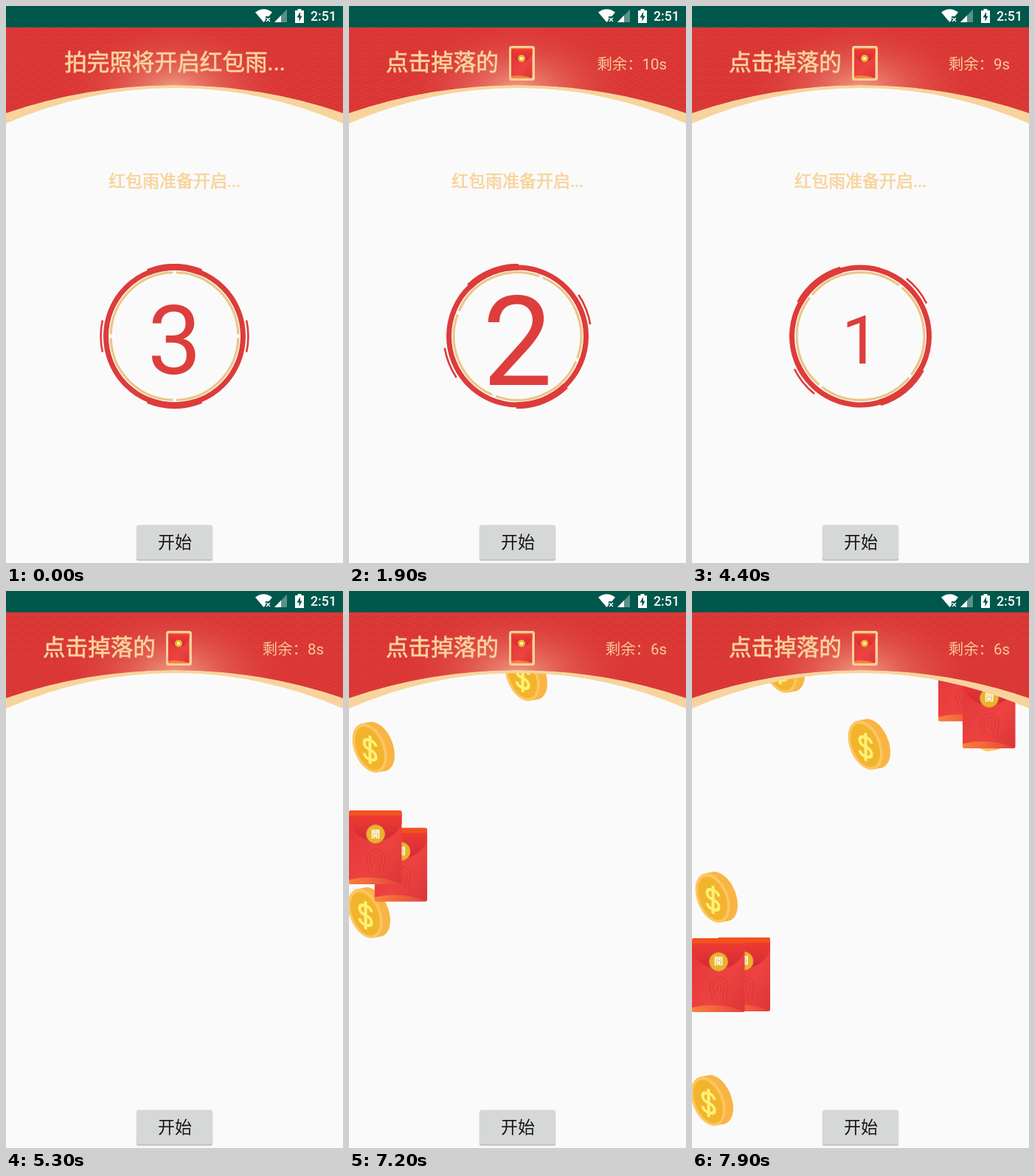
An HTML page for the animation above (8 s loop, 457 px wide and 754 px high).

```html
<!DOCTYPE html>
<html lang="zh-CN">
<head>
<meta charset="utf-8">
<style>
  html, body { margin: 0; height: 100%; overflow: hidden; background: #fafafa; }
  svg { display: block; width: 457px; height: 754px; font-family: Roboto, "Noto Sans CJK SC", "Noto Sans CJK", sans-serif; }
  .gold { fill: #f8d49c; }
  .strong { stroke: #f8d49c; stroke-width: .7; }
  .ring { fill: none; stroke: #dd3c3a; }
</style>
</head>
<body>
<svg viewBox="0 0 457 754">
  <defs>
    <radialGradient id="glow" gradientUnits="userSpaceOnUse" cx="0" cy="0" r="1" gradientTransform="translate(228.5 112) scale(150 88)">
      <stop offset="0" stop-color="#f2ae90" stop-opacity=".85"/>
      <stop offset=".45" stop-color="#ea7c6c" stop-opacity=".45"/>
      <stop offset="1" stop-color="#e04540" stop-opacity="0"/>
    </radialGradient>
    <linearGradient id="paper" x1="0" y1="0" x2="1" y2="1">
      <stop offset="0" stop-color="#e2343a"/>
      <stop offset=".6" stop-color="#ec4340"/>
      <stop offset="1" stop-color="#dc3539"/>
    </linearGradient>
    <linearGradient id="flap" x1="0" y1="0" x2="0" y2="1">
      <stop offset="0" stop-color="#ee3c30"/>
      <stop offset="1" stop-color="#d4283a"/>
    </linearGradient>
    <linearGradient id="hem">
      <stop offset="0" stop-color="#f9803c"/>
      <stop offset="1" stop-color="#e6413d"/>
    </linearGradient>
    <pattern id="waves" width="22" height="11" patternUnits="userSpaceOnUse">
      <g fill="none" stroke="#b91f25" stroke-opacity=".28">
        <path d="M0 11a11 10 0 0 1 22 0M4 11a7 6.5 0 0 1 14 0M8 11a3 3 0 0 1 6 0"/>
        <path d="M0 0q8 1 11 6q3-5 11-6M0 4q5 1 7 4M22 4q-5 1-7 4"/>
      </g>
    </pattern>
    <clipPath id="dial"><rect x="127" y="349" width="203" height="197"/></clipPath>
    <clipPath id="sheet"><rect width="71.5" height="100" rx="3"/></clipPath>
    <path id="panel" d="M0 29H457V145A706 706 0 0 0 0 145Z"/>

    <g id="envelope" clip-path="url(#sheet)">
      <rect width="72" height="100" fill="url(#paper)"/>
      <path d="M0 6H72V17Q62 40 36 42Q10 40 0 17Z" fill="url(#flap)"/>
      <path d="M0 0H72V7H0Z" fill="#f4511f"/>
      <g fill="none" stroke="#b92332" stroke-opacity=".4">
        <path d="M27 84V76Q21 68 27 59Q35 48 45 56Q52 64 47 74V84M31 80V73Q26 66 31 61Q37 54 43 61Q46 67 42 74V82M35 72Q32 65 37 63Q42 65 38 75"/>
      </g>
      <path d="M0 94Q34 86 64 97L72 100H0Z" fill="url(#hem)"/>
      <circle cx="36" cy="32" r="12.5" fill="#e9b32c" stroke="#d99a26"/>
      <text x="36" y="36.5" font-size="12.5" font-weight="700" fill="#fff" text-anchor="middle">開</text>
    </g>

    <ellipse id="disc" rx="21" ry="35" transform="rotate(-22)"/>
    <g id="coin">
      <g fill="#f9b544">
        <use href="#disc" x="34.5" y="33.5"/>
        <use href="#disc" x="29" y="34.5"/>
      </g>
      <use href="#disc" x="24" y="35.5" fill="#fdc663"/>
      <ellipse rx="17.5" ry="31" transform="translate(24 36) rotate(-22)" fill="#f3b42d"/>
      <path transform="translate(24.5 38) skewY(18)" fill="none" stroke="#fdf274" stroke-width="4"
        d="M8-7Q7-13 0-13Q-8-13-8-7Q-8-1 0 0Q8 1 8 7Q8 13 0 13Q-7 13-8 7M0-19V19"/>
    </g>
  </defs>

  <rect width="457" height="754" fill="#fafafa"/>

  <g id="countdown">
    <text class="gold strong" x="228.5" y="245" font-size="23" text-anchor="middle">红包雨准备开启...</text>
    <g clip-path="url(#dial)">
      <g id="outer" class="ring">
        <circle cx="228.5" cy="447" r="93" stroke-width="7"/>
        <circle cx="228.5" cy="447" r="93.7" stroke-width="9" pathLength="360" stroke-dasharray="45 135" stroke-dashoffset="-67.5"/>
        <circle cx="228.5" cy="447" r="100" stroke-width="2.6" pathLength="360" stroke-dasharray="25 155" stroke-dashoffset="12.5"/>
      </g>
      <circle id="inner" cx="228.5" cy="447" r="86.4" fill="none" stroke="#ebc688" stroke-width="3.2" pathLength="360" stroke-dasharray="86.6 3.4" stroke-dashoffset="-1.7"/>
    </g>
    <text id="digit" y="48" font-size="130" fill="#dd3e3c" text-anchor="middle"></text>
  </g>

  <g id="rain"></g>

  <path d="M0 28H457V159A568 568 0 0 0 0 159Z" fill="#f8d49c"/>
  <use href="#panel" fill="#de3a38"/>
  <use href="#panel" fill="url(#waves)"/>
  <use href="#panel" fill="url(#glow)"/>
  <text id="intro" class="gold strong" x="229" y="86.500" font-size="30.6" text-anchor="middle">拍完照将开启红包雨...</text>
  <g id="play">
    <text class="gold strong" x="50" y="86.500" font-size="30.6">点击掉落的</text>
    <rect x="217" y="54" width="35" height="47" rx="3.5" fill="#f8d096"/>
    <rect x="220" y="57.500" width="28.500" height="40" rx="1" fill="url(#paper)"/>
    <path d="M220 58H248.500V65Q244 75 234 76Q224 75 220 65Z" fill="url(#flap)"/>
    <path d="M220 57.500H248.500V59H220Z" fill="#f4511f"/>
    <path d="M220 95Q234 92 248.500 97.500H220Z" fill="#f9803c"/>
    <circle cx="234" cy="71" r="5" fill="#eab42c"/>
    <rect x="232" y="69" width="4" height="4" fill="#fff1b8"/>
    <text id="left" x="431" y="86" font-size="20.4" fill="#f7cb96" text-anchor="end"></text>
  </g>

  <rect width="457" height="29" fill="#00574b"/>
  <g fill="#fff">
    <path d="M338 8.5Q349.5 0 361 8.5L356.5 14H352V19L349.5 22Z"/>
    <path d="M353 16l5 5m0-5l-5 5" stroke="#fff" stroke-width="1.4"/>
    <path d="M364 22L381 4.5V22Z" opacity=".35"/>
    <path d="M364 22L373 12.7V22Z"/>
    <path d="M392 6H395.5V4H400.5V6H404V23H392Z"/>
    <path d="M399 8L394.5 15.5H397.5V21L401.5 13.5H399Z" fill="#00574b"/>
    <text x="413" y="20" font-size="17.8" font-weight="500">2:51</text>
  </g>

  <rect x="176.5" y="704" width="104" height="47.5" rx="3" opacity=".1"/>
  <rect x="177" y="704" width="103" height="46.5" rx="2.5" opacity=".16"/>
  <rect x="177" y="702.5" width="103" height="46.5" rx="2.5" fill="#d6d8d7"/>
  <rect id="press" x="177" y="702.5" width="103" height="46.5" rx="2.5"/>
  <text x="229" y="734" font-size="23" fill="#161616" text-anchor="middle">开始</text>
</svg>
<script>
const LOOP = 8000, STEP = 100;
const $ = id => document.getElementById(id);
const show = (id, on) => $(id).setAttribute('display', on ? 'inline' : 'none');
const clamp = v => Math.min(1, Math.max(0, v));
const ease = p => (1 - Math.cos(Math.PI * clamp(p))) / 2;

// shape, x, y at 7200 ms, speed in px per second
const drops = [
  ['coin', 4, 177, 290], ['coin', -2, 401, 363], ['coin', 211, 80, 133],
  ['coin', 95, -106, 250], ['coin', 369, -106, 363],
  ['envelope', 34.5, 320.5, 212], ['envelope', 0, 297, 247],
  ['envelope', 334, -72, 212], ['envelope', 367, -60, 247],
].map(([shape, x, y, speed]) => {
  const node = document.createElementNS('http://www.w3.org/2000/svg', 'use');
  node.setAttribute('href', '#' + shape);
  $('rain').append(node);
  return { node, x, y, speed };
});

function drawCountdown(t) {
  const turn = Math.max(0, .0789 * (t - 1626));
  $('outer').setAttribute('transform', `rotate(${-turn} 228.5 447)`);
  $('inner').setAttribute('transform', `rotate(${turn} 228.5 447)`);
  const tick = t < 2500 ? 1600 : 2500;
  const scale = t < 1600 ? 1 : 1.455 - .755 * ease((t - tick) / 1000);
  $('digit').textContent = t < 1600 ? 3 : t < 2500 ? 2 : 1;
  $('digit').setAttribute('transform', `translate(228.5 450.3) scale(${scale})`);
}

function draw(t) {
  const started = t >= 1500;
  show('intro', !started);
  show('play', started);
  show('countdown', t < 4600);
  show('rain', t >= 6000);
  drawCountdown(t);
  $('left').textContent = `剩余：${10 - [4300, 5300, 6300, 7200].filter(s => t >= s).length}s`;
  $('press').setAttribute('opacity', t < 1300 ? 0 : .12 * clamp((1900 - t) / 400));
  for (const d of drops)
    d.node.setAttribute('transform', `translate(${d.x} ${d.y + d.speed * (t - 7200) / 1000})`);
}

const start = performance.now();
function loop() {
  const t = (performance.now() - start) % LOOP;
  draw(Math.floor(t / STEP) * STEP);
  requestAnimationFrame(loop);
}
loop();
</script>
</body>
</html>
```
